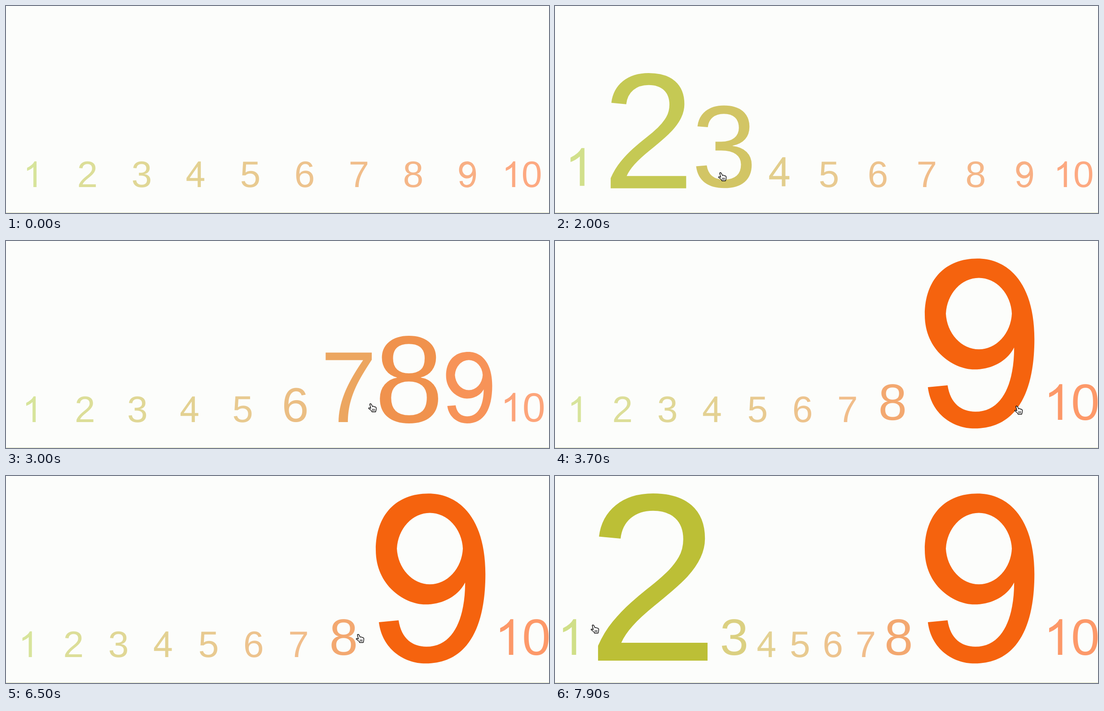
An HTML page for the animation above (8 s loop, 1210x463 px).

```html
<!DOCTYPE html>
<html lang="en">
<head>
<meta charset="utf-8">
<title>Growing numbers</title>
<style>
  html, body { margin: 0; width: 100%; height: 100%; overflow: hidden; background: #fcfdfb; }
  svg { display: block; width: 1210px; height: 463px; }
  text {
    font: 103px "Liberation Sans", Arial, sans-serif;
    text-anchor: middle;
    text-rendering: geometricPrecision;
  }
</style>
</head>
<body>
<svg viewBox="0 0 1210 463">
  <rect y="462" width="1210" height="1" fill="#d8dcb4"/>
  <g id="row"></g>
  <g id="hand" stroke="#000" stroke-linecap="round" stroke-linejoin="round">
    <path d="M4 2Q6 0 8 3L10 7.5Q13 6 14 8Q18 8 18.5 11Q18.5 15 17 19.5H9Q8 16 2 12.5Q0 9 6.2 11.5Z" fill="#fff" stroke-width="1.4"/>
    <path d="M10 13v4m2.3-4v4m2.3-4v4" fill="none"/>
  </g>
</svg>
<script>
const LOOP = 8000, TICK = 100, EASE = 400, WIDTH = 1210;
const EM = 2048, ADVANCE = 1139 / EM;
const SVG = "http://www.w3.org/2000/svg";

// Digits whose shape differs clearly from the installed sans face.
const shapes = {
  1: "M763 0H583V1147Q434 1005 223 930V1104Q530 1250 647 1472H763Z",
  4: "M662 0V351H26V516L695 1466H842V516H1040V351H842V0ZM662 516V1177L203 516Z",
  9: "M112 339L285 355C310 190 410 123 528 123C790 123 870 420 869 688C820 590 698 495 519 495S85 660 85 975S270 1472 546 1472S1047 1250 1047 763S880 -25 523 -25C330 -25 140 105 112 339ZM849 987A290 334 0 0 0 270 987A290 334 0 0 0 849 987Z"
};

const BASE = { size: 80, baseline: 405, room: 80, alpha: 0.5 };
const NEAR = { size: 111, baseline: 400, room: 106.4, alpha: 0.6 };
const BIG = { size: 520, baseline: 413, room: 520, alpha: 1 };

// The pointer hovers over one number after another; 0 is none of them.
const PICKED = 9, PICK_TIME = 3800;
const hovers = [{ time: -EASE, hover: 0 }];
function sweep(start, step, ...stops) {
  stops.forEach((hover, i) => hovers.push({ time: start + i * step, hover }));
}
sweep(700, 0, 1);
sweep(1650, 190, 2, 3, 4);
sweep(2434, 106, 5, 6, 7, 8, 9);
sweep(PICK_TIME, 400, 9, 0);
sweep(6510, 398, 8, 7);
sweep(7024, 21, 6, 0);
sweep(7200, 93, 5, 4, 3, 2);

// Pointer visits: time, x, y.
const visits = [
  [[600, 160, 440], [1300, 74, 384], [1500, 74, 384], [2500, 652, 359], [3700, 1023, 368], [4200, 1060, 436]],
  [[6100, 1000, 436], [6500, 779, 353], [7200, 375, 342], [7900, 79, 332], [LOOP, 79, 332]]
];

const row = document.getElementById("row");
const hand = document.getElementById("hand");

const mix = (a, b, k) => a + (b - a) * k;

function smooth(x) {
  x = Math.min(1, Math.max(0, x));
  return x * x * (3 - 2 * x);
}

function add(parent, tag, attrs) {
  const el = document.createElementNS(SVG, tag);
  for (const key in attrs) el.setAttribute(key, attrs[key]);
  return parent.appendChild(el);
}

function drawDigit(parent, digit, x) {
  if (shapes[digit]) {
    const k = 100 / EM;
    add(parent, "path", {
      d: shapes[digit],
      "fill-rule": "evenodd",
      transform: `translate(${x - 50 * ADVANCE} 0) scale(${k} ${-k})`
    });
  } else {
    add(parent, "text", { x }).textContent = digit;
  }
}

function tint(k) {
  return `rgb(${mix(180, 253, k)}, ${mix(204, 86, k)}, ${mix(60, 8, k)})`;
}

const numbers = Array.from({ length: 10 }, (_, i) => {
  const label = String(i + 1);
  const el = add(row, "g", { fill: tint(i / 9) });
  [...label].forEach((digit, k) =>
    drawDigit(el, digit, (k - (label.length - 1) / 2) * 100 * ADVANCE));
  return { n: i + 1, chars: label.length, el };
});

function goal(n, { time, hover }) {
  const active = [hover, time >= PICK_TIME ? PICKED : 0].filter(Boolean);
  if (active.includes(n)) return BIG;
  return active.some(a => Math.abs(a - n) === 1) ? NEAR : BASE;
}

// Each change of goal eases in on top of the ones before it.
function poseAt(n, t) {
  const pose = { ...BASE };
  hovers.slice(1).forEach((step, i) => {
    const from = goal(n, hovers[i]), to = goal(n, step);
    const k = smooth((t - step.time) / EASE);
    for (const key in pose) pose[key] += (to[key] - from[key]) * k;
  });
  return pose;
}

// Equal shares, except for cells whose content needs more.
function cellWidths(needs) {
  const wide = new Set();
  for (;;) {
    let room = WIDTH;
    wide.forEach(i => room -= needs[i]);
    const share = room / (needs.length - wide.size);
    const before = wide.size;
    needs.forEach((need, i) => { if (need > share) wide.add(i); });
    if (wide.size === before) return needs.map((need, i) => wide.has(i) ? need : share);
  }
}

function placeHand(t) {
  const path = visits.find(p => t >= p[0][0] && t <= p.at(-1)[0]);
  hand.setAttribute("visibility", path ? "visible" : "hidden");
  if (!path) return;
  const i = Math.max(1, path.findIndex(p => p[0] >= t));
  const [t0, x0, y0] = path[i - 1], [t1, x1, y1] = path[i];
  const k = (t - t0) / (t1 - t0);
  hand.setAttribute("transform", `translate(${mix(x0, x1, k)} ${mix(y0, y1, k)})`);
}

function render(t) {
  const poses = numbers.map(({ n }) => poseAt(n, t));
  const widths = cellWidths(poses.map((p, i) => p.room * ADVANCE * numbers[i].chars));
  let x = 0;
  numbers.forEach(({ el }, i) => {
    const { size, baseline, alpha } = poses[i];
    el.setAttribute("transform",
      `translate(${x + widths[i] / 2} ${baseline}) scale(${size / 100})`);
    el.setAttribute("fill-opacity", alpha);
    x += widths[i];
  });
  placeHand(t);
}

const start = performance.now();
function frame() {
  const t = (performance.now() - start) % LOOP;
  render(Math.floor(t / TICK) * TICK);
  requestAnimationFrame(frame);
}
frame();
</script>
</body>
</html>
```
